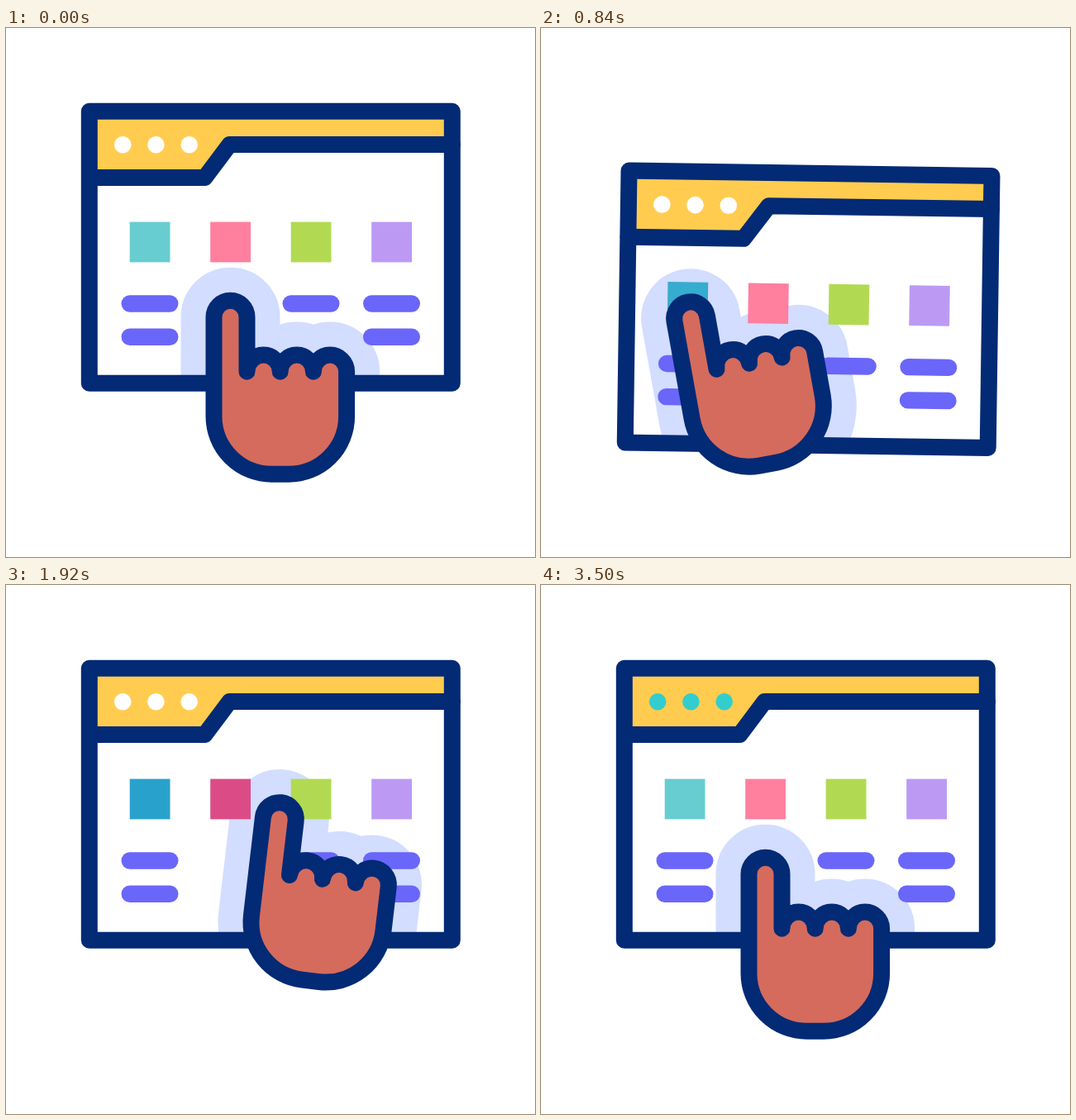
Write an HTML page with a canvas that moves like this. It is 640x640 px and loops after 3.6 s.

```html
<!DOCTYPE html>
<html lang="en">
<head>
<meta charset="utf-8">
<title>Choosing tiles</title>
<style>
  html, body { margin: 0; width: 100%; height: 100%; overflow: hidden; background: #fff; }
  canvas { display: block; width: 100vw; height: 100vh; }
</style>
</head>
<body>
<canvas id="stage" width="640" height="640"></canvas>
<script>
const ctx = document.getElementById('stage').getContext('2d');
const LOOP = 3600;
const NAVY = '#032a75', SKIN = '#d56b5d', HALO = '#d2ddff', YELLOW = '#ffcc50', BAR = '#6a66fa';

const linear = u => u;
const inOut = u => 0.5 - 0.5 * Math.cos(Math.PI * u);
const out = u => Math.sin(u * Math.PI / 2);

// Each key: time, values, easing of the segment that leads to it.
const swayKeys = [[110, [0]], [570, [-1], inOut], [1030, [1], inOut], [1490, [0], inOut]];
const liftKeys = [[110, [0]], [330, [-36], inOut], [850, [75], inOut], [1480, [0], inOut]];

// Fingertip x, y and hand angle in window coordinates.
const rest = [271.5, 349.7, 0], onTeal = [178, 278.5, -11], onPink = [273, 289, 1], onPurple = [466, 269.5, 20];
const handKeys = [
  [110, rest], [580, onTeal, out], [880, onTeal],
  [1120, [245, 289, -3.6], linear], [1360, [274, 288, 2.8], out], [1480, onPink, inOut],
  [1830, onPink], [2300, onPurple, out],
  [2900, onPurple], [3360, rest, out]
];

// x, base colour, picked colour, time at which picking starts
const tiles = [
  [149.7, [103, 205, 209], [40, 162, 205], 640],
  [247.2, [255, 127, 159], [219, 76, 134], 1460],
  [344.7, [177, 218, 82]],
  [442.2, [188, 154, 244], [107, 102, 246], 2410]
];
const bars = [[0, 333.5], [0, 373.7], [2, 333.5], [3, 333.5], [3, 373.7]];

const clamp01 = u => Math.max(0, Math.min(1, u));
const mix = (a, b, u) => a.map((v, i) => v + (b[i] - v) * u);

function sample(keys, t) {
  const next = keys.findIndex(key => key[0] > t);
  if (next < 0) return keys[keys.length - 1][1];
  if (next === 0) return keys[0][1];
  const [t0, from] = keys[next - 1];
  const [t1, to, ease = linear] = keys[next];
  return mix(from, to, ease((t - t0) / (t1 - t0)));
}

function tileColor([, base, picked, start], t) {
  if (!picked) return `rgb(${base})`;
  const amount = clamp01((t - start) / 260) - clamp01((t - 3240) / 260);
  return `rgb(${mix(base, picked, amount).map(Math.round)})`;
}

// Outline with the fingertip centre at the origin.
function handPath() {
  const p = new Path2D();
  p.moveTo(-20, 120);
  p.lineTo(-20, 0);
  p.arc(0, 0, 20, Math.PI, 0);
  p.lineTo(20, 66);
  for (const x of [40.1, 80.3, 120.5]) p.arc(x, 66, 20.1, Math.PI, 0);
  p.lineTo(140.6, 120);
  p.arc(70.6, 120, 70, 0, Math.PI / 2);
  p.arc(50, 120, 70, Math.PI / 2, Math.PI);
  p.closePath();
  return p;
}
const hand = handPath();

function polyline(points) {
  ctx.beginPath();
  points.forEach(([x, y]) => ctx.lineTo(x, y));
}

function stroke(color, width) {
  ctx.strokeStyle = color;
  ctx.lineWidth = width;
  ctx.stroke();
}

function drawHand([x, y, angle], fill, line, width) {
  ctx.save();
  ctx.translate(x, y);
  ctx.rotate(angle * Math.PI / 180);
  ctx.fillStyle = fill;
  ctx.fill(hand);
  ctx.strokeStyle = line;
  ctx.lineWidth = width;
  ctx.stroke(hand);
  ctx.restore();
}

function drawWindow(t, pose) {
  ctx.save();
  ctx.beginPath();
  ctx.rect(101, 101, 439, 329);
  ctx.clip();
  drawHand(pose, HALO, HALO, 80);
  ctx.restore();

  const tab = [[101, 181], [240.5, 181], [270.5, 141], [540, 141]];
  polyline([...tab, [540, 101], [101, 101]]);
  ctx.fillStyle = YELLOW;
  ctx.fill();

  const lit = (t >= 2840 && t < 2920) || t >= 3500;
  ctx.fillStyle = lit ? '#33cdcd' : '#fff';
  for (const x of [141.2, 181.4, 221.7]) {
    ctx.beginPath();
    ctx.arc(x, 141.2, 10.3, 0, Math.PI * 2);
    ctx.fill();
  }

  for (const tile of tiles) {
    ctx.fillStyle = tileColor(tile, t);
    ctx.fillRect(tile[0], 234.6, 48.8, 48.8);
  }
  for (const [column, y] of bars) {
    const x = tiles[column][0];
    polyline([[x, y], [x + 48.6, y]]);
    stroke(BAR, 20.4);
  }

  polyline(tab);
  stroke(NAVY, 20);
  ctx.beginPath();
  ctx.rect(100.8, 100.8, 439, 329);
  stroke(NAVY, 20);
}

function draw(t) {
  const [sway] = sample(swayKeys, t);
  const [lift] = sample(liftKeys, t);
  const pose = sample(handKeys, t);

  ctx.fillStyle = '#fff';
  ctx.fillRect(0, 0, 640, 640);
  ctx.lineCap = ctx.lineJoin = 'round';

  ctx.save();
  ctx.translate(320.3 + 12 * sway, 265.3 + lift);
  ctx.rotate(3 * sway * Math.PI / 180);
  ctx.translate(-320.3, -265.3);
  drawWindow(t, pose);
  drawHand(pose, SKIN, NAVY, 20);
  ctx.restore();
}

const start = performance.now();
function tick() {
  draw((performance.now() - start) % LOOP);
  requestAnimationFrame(tick);
}
tick();
</script>
</body>
</html>
```
